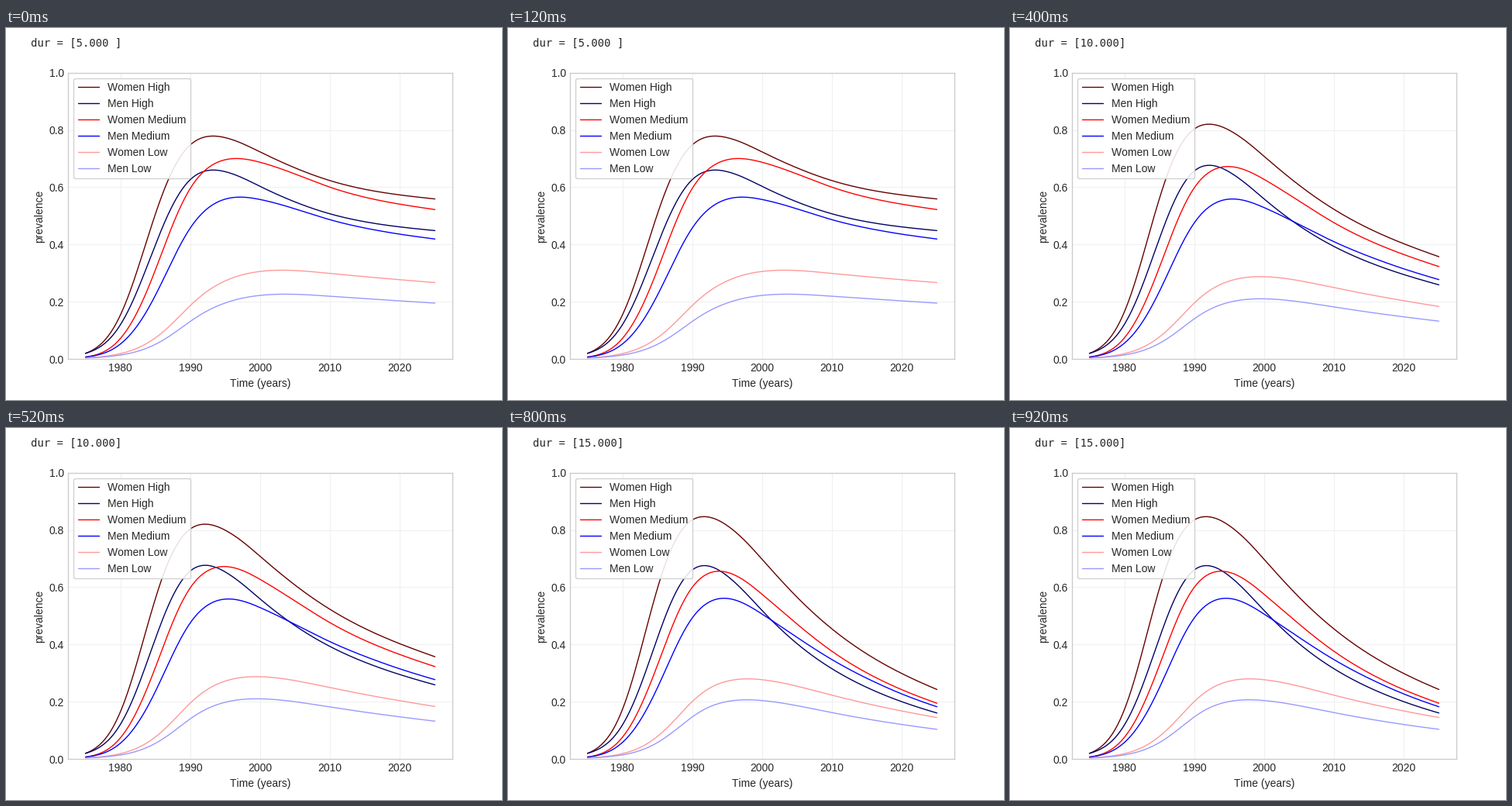
Animation, 640 px wide and 480 px high, one loop 1000 ms. Source, as a matplotlib script:

```python
import numpy as np
import matplotlib.pyplot as plt
from matplotlib.animation import FuncAnimation

INK, EDGE = "0.15", "0.8"
plt.rcParams.update({
    "font.family": "Liberation Sans", "font.size": 10, "text.kerning_factor": 6,
    "text.color": INK, "axes.labelcolor": INK,
    "xtick.color": INK, "ytick.color": INK,
    "xtick.major.size": 0, "ytick.major.size": 0,
    "axes.edgecolor": EDGE, "axes.linewidth": 1, "axes.axisbelow": True,
    "lines.solid_capstyle": "round",
})

FRAMES = 5
YEARS = np.linspace(1975, 2025, 251)
KEY_YEARS = np.array([1975, 1980, 1985, 1990, 1995, 2000, 2010, 2025], float)


def logit(p):
    return np.log(p / (1 - p))


def mix(pair, u):
    return pair[0] + (pair[1] - pair[0]) * u


def spline(x, y, at):
    """Natural cubic spline through the points (x, y)."""
    h = np.diff(x)
    system, rhs = np.eye(len(x)), np.zeros(len(x))
    for i in range(1, len(x) - 1):
        system[i, i - 1:i + 2] = h[i - 1], 2 * (h[i - 1] + h[i]), h[i]
        rhs[i] = 6 * ((y[i + 1] - y[i]) / h[i] - (y[i] - y[i - 1]) / h[i - 1])
    m = np.linalg.solve(system, rhs)
    k = np.clip(np.searchsorted(x, at) - 1, 0, len(h) - 1)
    a, b, w = x[k + 1] - at, at - x[k], h[k]
    return ((m[k] * a**3 + m[k + 1] * b**3) / (6 * w)
            + (y[k] / w - m[k] * w / 6) * a
            + (y[k + 1] / w - m[k + 1] * w / 6) * b)


def women(u, short, long, bend):
    """Blend the shortest- and longest-duration epidemics on the logit scale."""
    ends = logit(np.array([short, long]))
    keys = mix(ends, u * (1 + bend * (1 - u)))
    return 1 / (1 + np.exp(-spline(KEY_YEARS, keys, YEARS)))


def men(u, prevalence, early, late):
    """Scale the women's cumulative hazard by a slowly drifting ratio."""
    x = np.clip((YEARS - 1980) / 38, 0, 1)
    ratio = mix((mix(early, u), mix(late, u)), x * x * (3 - 2 * x))
    ratio += (1 - ratio) * np.exp(-(YEARS - 1975) / 3)
    return 1 - (1 - prevalence) ** ratio


# Per group: colours, women's prevalence at KEY_YEARS for the shortest and the
# longest duration, bend of the blend, men's hazard ratio early and late.
GROUPS = {
    "High": ("#660000", "#000066",
             (0.02, 0.154, 0.506, 0.748, 0.773, 0.723, 0.623, 0.559),
             (0.02, 0.173, 0.595, 0.835, 0.815, 0.697, 0.454, 0.243),
             0.4, (0.71, 0.59), (0.727, 0.63)),
    "Medium": ("#ff0000", "#0000ff",
               (0.007, 0.072, 0.311, 0.596, 0.696, 0.687, 0.600, 0.522),
               (0.007, 0.076, 0.327, 0.600, 0.652, 0.575, 0.376, 0.195),
               0.2, (0.66, 0.70), (0.736, 0.93)),
    "Low": ("#ff9999", "#9999ff",
            (0.004, 0.019, 0.074, 0.187, 0.273, 0.306, 0.299, 0.267),
            (0.004, 0.019, 0.079, 0.201, 0.272, 0.277, 0.223, 0.145),
            0.52, (0.675, 0.71), (0.70, 0.70)),
}

fig, ax = plt.subplots(figsize=(6.4, 4.8), dpi=100)
lines = {}
for name, (women_color, men_color, *_) in GROUPS.items():
    lines[name] = [ax.plot([], [], color=color, lw=1, label=f"{sex} {name}")[0]
                   for sex, color in (("Women", women_color), ("Men", men_color))]

ax.set(xlim=(1972.5, 2027.5), ylim=(0, 1), xlabel="Time (years)", ylabel="prevalence")
ax.set_xticks(range(1980, 2021, 10))
ax.grid(color="#f0f0f0", lw=0.8)
ax.legend(loc="upper left", frameon=True, framealpha=0.88, edgecolor=EDGE)
caption = fig.text(0.05, 0.95, "", family="DejaVu Sans Mono")


def update(step):
    u = step / (FRAMES - 1)
    caption.set_text(f"dur = [{5 + 10 * u:<6.3f}]")
    for name, (_, _, short, long, bend, early, late) in GROUPS.items():
        prevalence = women(u, short, long, bend)
        lines[name][0].set_data(YEARS, prevalence)
        lines[name][1].set_data(YEARS, men(u, prevalence, early, late))
    return [caption, *sum(lines.values(), [])]


anim = FuncAnimation(fig, update, frames=FRAMES, interval=200,
                     repeat=True, repeat_delay=0)
plt.show()
```
